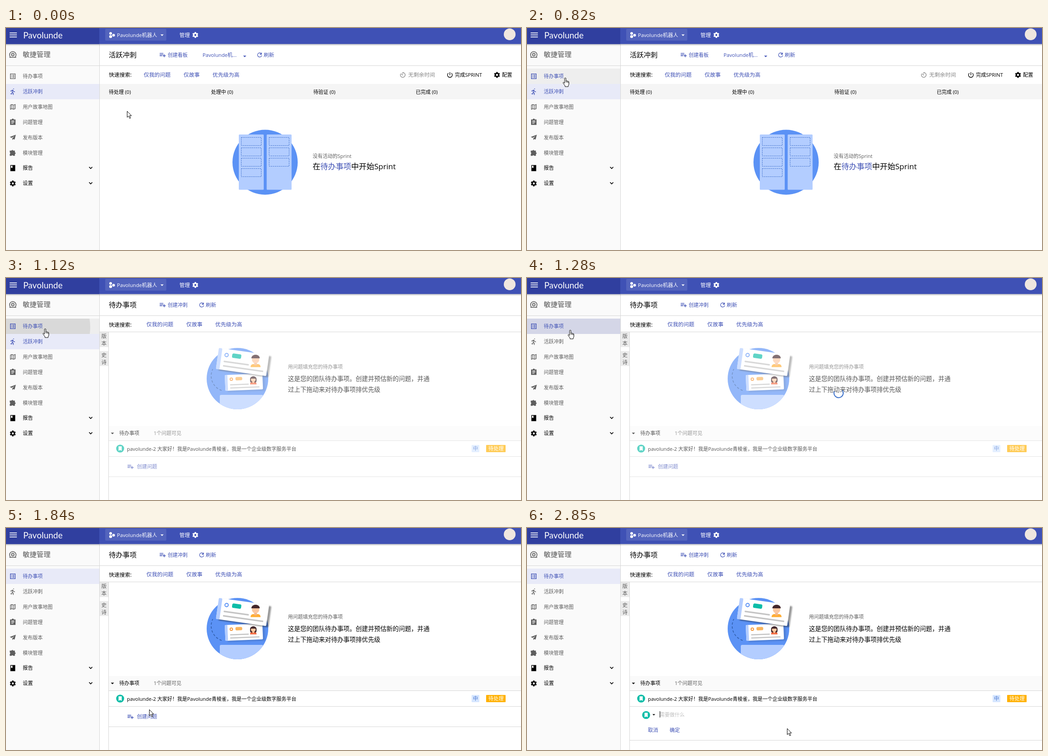
Write an HTML page with a canvas that moves like this. It is 1137 px wide and 492 px high and loops after 2.91 s.

```html
<!DOCTYPE html>
<html lang="zh">
<head>
<meta charset="utf-8">
<title>敏捷管理</title>
<style>
html, body { margin: 0; width: 100%; height: 100%; overflow: hidden; background: #fff; }
canvas { display: block; width: 1137px; height: 492px; }
</style>
</head>
<body>
<canvas id="stage" width="1137" height="492"></canvas>
<script>
const ctx = document.getElementById('stage').getContext('2d');
const LOOP = 2910, TAU = Math.PI * 2;
const FONT = '"Open Sans", "Noto Sans CJK SC", "Noto Sans CJK", sans-serif';
const BRAND = 'Pavolunde';
const INDIGO = '#3f51b5', GRAY = '#5e5e5e', BLUE = '#5b92f5', PALE = '#b3cdff', TEAL = '#0dbda8', RULE = '#d6d6d6';

// The screen is refreshed only at these moments.
const TICKS = [0, 40, 120, 200, 280, 360, 430, 510, 600, 680, 740, 820,
  970, 1050, 1120, 1200, 1280, 1350, 1430, 1530, 1650, 1710, 1770, 1840, 1890, 1980,
  2060, 2130, 2200, 2350, 2440, 2520, 2600, 2680, 2770, 2850];

// Pointer hotspot: time, x, y
const PATH = [[0, 267, 184], [510, 93, 123], [530, 93, 123], [820, 84, 110], [970, 84, 110],
  [1120, 86, 112], [1430, 103, 117], [1530, 103, 117], [1840, 316, 402], [1980, 305, 429],
  [2200, 305, 414], [2520, 305, 414], [2850, 574, 444]];

// Icons on a 24 unit grid
const STROKED = {
  list: 'M4 4H20V20H4ZM7 8H9M11 8H17M7 12H9M11 12H17M7 16H9M11 16H17',
  map: 'M4 6L9 4L15 6L20 4V18L15 20L9 18L4 20ZM9 4V18M15 6V20',
  run: 'M13 3H16M6 12V9L12 7L14 11L19 13M12 7L10 14L14 17V23M10 14L9 20L4 19',
  add: 'M2 7H14M2 11H14M2 15H10M17 10V20M12 15H22',
  refresh: 'M17.5 6.5A8 8 0 1 0 20 14M19 5V10H14Z',
  power: 'M12 3V13M7 6A8 8 0 1 0 17 6',
  timer: 'M12 8V4A8 8 0 1 1 5 8M12 13L7 8',
  agile: 'M2 20H22M6 20A9.5 9.5 0 1 1 18 20M8 12A4 4 0 0 0 16 12A4 4 0 0 0 8 12M11 12H13'
};
const FILLED = {
  clip: 'M3 3H9A3 3 0 0 1 15 3H21V21H3ZM7 7V9H17V7ZM7 11V13H17V11ZM7 15V17H14V15Z',
  plane: 'M22 3L2 10.5L8 13.5L18 7L10.5 15V21L13.5 17L18 19Z',
  puzzle: 'M4 5H8A2.5 2.5 0 0 1 13 5H19V11A2.5 2.5 0 0 1 19 16V22H13A2.7 2.7 0 0 0 8 22H2V16A2.7 2.7 0 0 0 2 11V5Z',
  book: 'M4 2H20V22H4ZM6 4V12L8.5 10.5L11 12V4Z',
  mark: 'M6 3H18V20L12 17L6 20Z'
};
const ARROW = new Path2D('M.5 .5V14L3.6 11L6 16.4L8.2 15.4L5.8 10.3H10Z');
const HAND = new Path2D('M4 11V2a1.5 1.5 0 0 1 3 0V7q1.5-1 2.5.5q1.5-.5 2.3.8q1.7-.2 1.7 1.5V14q0 2-1.5 4V20H5V18L1 12.5q-1-2 .5-2.3q1 0 2.5 2.3z');

function rect(x, y, w, h, color) {
  ctx.fillStyle = color;
  ctx.fillRect(x, y, w, h);
}
function round(x, y, w, h, r, color) {
  ctx.fillStyle = color;
  ctx.beginPath();
  ctx.roundRect(x, y, w, h, r);
  ctx.fill();
}
function disc(x, y, r, color) {
  ctx.fillStyle = color;
  ctx.beginPath();
  ctx.arc(x, y, r, 0, TAU);
  ctx.fill();
}
function arc(x, y, r, from, to, width, color) {
  ctx.strokeStyle = color;
  ctx.lineWidth = width;
  ctx.beginPath();
  ctx.arc(x, y, r, from, to);
  ctx.stroke();
}
function poly(color, ...points) {
  ctx.fillStyle = color;
  ctx.beginPath();
  points.forEach(([x, y]) => ctx.lineTo(x, y));
  ctx.fill();
}
// y is the vertical middle of the line
function text(value, x, y, size = 11, color = '#000', font = FONT) {
  ctx.font = `${size}px ${font}`;
  ctx.fillStyle = color;
  ctx.fillText(value, x, Math.round(y + size * 0.37));
}
function icon(name, x, y, color, size = 16) {
  ctx.save();
  ctx.translate(x - size / 2, y - size / 2);
  ctx.scale(size / 24, size / 24);
  ctx.lineWidth = 2;
  ctx.strokeStyle = ctx.fillStyle = color;
  if (STROKED[name]) ctx.stroke(new Path2D(STROKED[name]));
  else ctx.fill(new Path2D(FILLED[name]), 'evenodd');
  ctx.restore();
}
function gear(x, y, color) {
  arc(x, y, 3.6, 0, TAU, 2.8, color);
  ctx.lineWidth = 3.2;
  ctx.beginPath();
  for (let i = 0; i < 6; i++) {
    const a = i * TAU / 6 + TAU / 12;
    ctx.moveTo(x + 3.5 * Math.cos(a), y + 3.5 * Math.sin(a));
    ctx.lineTo(x + 6.5 * Math.cos(a), y + 6.5 * Math.sin(a));
  }
  ctx.stroke();
}
function caretDown(x, y, color, r = 3.5) {
  poly(color, [x - r, y - r / 2], [x + r, y - r / 2], [x, y + r / 2]);
}
function storyIcon(x, y) {
  disc(x, y, 8.8, TEAL);
  icon('mark', x, y + 0.3, '#fff', 14);
}

function pointerAt(t) {
  const i = PATH.findIndex(k => k[0] > t);
  if (i < 0) return PATH[PATH.length - 1].slice(1);
  const [t0, x0, y0] = PATH[i - 1], [t1, x1, y1] = PATH[i];
  let p = (t - t0) / (t1 - t0);
  if (i === 1) p = 1 - (1 - p) ** 2;
  return [x0 + (x1 - x0) * p, y0 + (y1 - y0) * p];
}
function drawPointer(x, y, hand) {
  ctx.save();
  ctx.translate(Math.round(x) - (hand ? 5 : 0), Math.round(y));
  const shape = hand ? HAND : ARROW;
  ctx.fillStyle = '#fff';
  ctx.strokeStyle = '#000';
  ctx.lineWidth = 1;
  ctx.fill(shape);
  ctx.stroke(shape);
  if (hand) ctx.stroke(new Path2D('M7 7V10.5M9.5 8V11M11.8 9V11.5'));
  ctx.restore();
}

function drawHeader() {
  const shade = ctx.createLinearGradient(0, 35, 0, 40);
  shade.addColorStop(0, 'rgba(0,0,0,.25)');
  shade.addColorStop(1, 'rgba(0,0,0,0)');
  rect(0, 35, 1137, 5, shade);
  rect(0, 0, 1137, 35.5, INDIGO);
  rect(0, 0, 206, 35.5, '#303f9f');
  for (let i = 0; i < 3; i++) rect(8, 10 + i * 4.5, 16, 1.7, '#fff');
  text(BRAND, 38, 16, 19, '#fff', 'Lato, sans-serif');
  round(219, 2, 135, 26, 2, '#5364bd');
  disc(231, 12, 3, '#fff');
  disc(231, 19, 3.2, '#fff');
  disc(237.5, 16, 3, '#fff');
  text(BRAND + '机器人', 245, 15.5, 11.2, '#fff');
  caretDown(344.5, 16, '#fff');
  text('管理', 383, 15.5, 11.5, '#fff');
  gear(418, 15.5, '#fff');
  disc(1112, 14, 13, '#efe6df');
}

function drawSidebar(t, py) {
  rect(0, 36, 206, 456, '#fafafa');
  rect(206, 36, 1, 456, RULE);
  rect(0, 83, 206, 1, RULE);
  icon('agile', 15, 59, '#555', 18);
  text('敏捷管理', 37, 58.5, 15.3, '#555');

  const switched = t >= 1200;
  const hovered = t >= 600 && t < 1650 && py < 124;
  rect(0, switched ? 90 : 124, 206, 34, '#e8eaf8');
  if (hovered) rect(0, 90, 206, 34, switched ? '#dde0f1' : '#eeeeee');
  if (t >= 970 && t < 1430) {
    ctx.save();
    ctx.beginPath();
    ctx.rect(0, 90, 206, 34);
    ctx.clip();
    const fade = Math.max(0, Math.min(1, (1430 - t) / 300));
    disc(84, 109, (t - 950) * 0.6, `rgba(0,0,0,${0.09 * fade})`);
    ctx.restore();
  }

  const items = [['list', '待办事项'], ['run', '活跃冲刺'], ['map', '用户故事地图'],
    ['clip', '问题管理'], ['plane', '发布版本'], ['puzzle', '模块管理']];
  items.forEach(([name, label], i) => {
    const y = 107 + i * 33.9;
    const lit = i === 0 ? hovered || switched : i === 1 && !switched;
    icon(name, 15, y, lit ? INDIGO : GRAY);
    text(label, 37, y, 11, lit ? INDIGO : GRAY);
  });
  icon('book', 15, 310.5, '#000');
  gear(15, 344.5, '#000');
  text('报告', 37, 310, 11.2);
  text('设置', 37, 344, 11.2);
  ctx.strokeStyle = '#000';
  ctx.lineWidth = 1.7;
  for (const y of [308, 342]) ctx.stroke(new Path2D(`M183.5 ${y}l3.5 3.5l3.5 -3.5`));
}

function drawToolbar(title, action, refreshX) {
  rect(207, 83, 930, 1, RULE);
  text(title, 227, 59.5, 15.3);
  icon('add', 346, 59.5, INDIGO);
  text(action, 357, 59.5, 11, INDIGO);
  icon('refresh', refreshX, 59.5, INDIGO, 14);
  text('刷新', refreshX + 9, 59.5, 11.5, INDIGO);
}
function drawFilters(x, y) {
  text('快速搜索:', 227, 104, 11.8);
  text('仅我的问题', x, y, 11.9, INDIGO);
  text('仅故事', x + 88, y, 11.9, INDIGO);
  text('优先级为高', x + 152, y, 11.9, INDIGO);
}

function drawSprintPage() {
  drawToolbar('活跃冲刺', '创建看板', 560);
  text(BRAND + '机...', 434, 60, 11.2, INDIGO);
  caretDown(527, 63, INDIGO);
  drawFilters(304, 104);
  icon('timer', 876, 104, '#888');
  text('无剩余时间', 888, 104, 11.8, '#888');
  icon('power', 980, 104, '#000');
  text('完成SPRINT', 991, 104, 11.2);
  gear(1084, 104, '#000');
  text('配置', 1095, 104, 11.3);

  rect(207, 124, 930, 34, '#f5f5f5');
  ['待处理', '处理中', '待验证', '已完成'].forEach((s, i) => text(s + ' (0)', 227 + i * 225.8, 142, 11));

  disc(572, 297.5, 72, BLUE);
  [[514, 4], [575.5, 3]].forEach(([x, count]) => {
    round(x, 236, 55, 122.5, 1.5, PALE);
    ctx.strokeStyle = '#4a78cf';
    ctx.lineWidth = 1;
    ctx.setLineDash([3, 1.5]);
    for (let i = 0; i < count; i++) ctx.strokeRect(x + 5.5, 242.5 + i * 23, 44, 18);
    ctx.setLineDash([]);
  });
  text('没有活动的Sprint', 677, 284, 11, GRAY);
  text('在', 677, 307, 17);
  text('待办事项', 694, 307, 17, INDIGO);
  text('中开始Sprint', 762, 307, 17);
}

function drawPerson(x, y, r, shirt, long) {
  if (long) round(x - r * 1.3, y - r * 1.2, r * 2.6, r * 2.7, r, '#43282c');
  round(x - r * 1.3, y + r * 1.15, r * 2.6, r * 0.8, [r * 0.7, r * 0.7, 0, 0], shirt);
  rect(x - r * 0.35, y + r * 0.7, r * 0.7, r * 0.75, '#f3b48c');
  disc(x, y, r * 0.95, '#fbc7a0');
  ctx.fillStyle = '#43282c';
  ctx.beginPath();
  ctx.ellipse(x, y - r * 0.35, r * 1.1, r * 0.95, 0, Math.PI, TAU);
  ctx.fill();
}
function drawTicket(x, y, angle, w, h, accent, tag, lines, shadow) {
  ctx.save();
  ctx.translate(x, y);
  ctx.rotate(angle);
  ctx.shadowColor = `rgba(0,0,0,${shadow})`;
  ctx.shadowOffsetX = 5;
  ctx.shadowOffsetY = 3;
  ctx.shadowBlur = 3;
  round(0, 0, w, h, 2, '#fff');
  ctx.shadowColor = 'transparent';
  round(0, 0, w * 0.07, h, 2, PALE);
  arc(w * 0.17, h * 0.28, h * 0.08, 0, TAU, 2, accent);
  round(w * 0.28, h * 0.16, w * 0.18, h * 0.21, 3, tag);
  lines.forEach(([ly, lw]) => round(w * 0.13, ly * h, lw * w, h * 0.07, 1, '#c4c4c4'));
  ctx.restore();
}
function drawBacklogArt() {
  disc(511, 223, 68, BLUE);
  ctx.save();
  ctx.beginPath();
  ctx.arc(511, 223, 68, 0, TAU);
  ctx.clip();
  round(472, 259, 96, 40, 3, PALE);
  ctx.restore();
  ctx.setLineDash([5, 4]);
  arc(487, 217, 34, 1.9, 3.6, 1.5, '#2f5ca8');
  ctx.setLineDash([]);
  drawTicket(483, 215, -0.04, 83, 35, '#f59b42', '#f9b55e', [[0.6, 0.5], [0.8, 0.78]], 0.12);
  drawPerson(546, 225, 5.5, '#f0643c', true);
  drawTicket(470, 155, 0.14, 112, 47, BLUE, TEAL, [[0.56, 0.5], [0.77, 0.8]], 0.4);
  drawPerson(551, 181, 8.5, '#ffad33', false);
}

function drawForm(t) {
  storyIcon(263, 414.5);
  caretDown(280, 414, '#000', 3);
  text('需要做什么', 293, 413.5, 11, '#bfbfbf');
  if (t >= 2600) rect(293, 406, 1, 14, '#000');
  text('取消', 267, 448, 11.3, INDIGO);
  text('确定', 315, 448, 11.3, INDIGO);
  rect(227, 470, 910, 1, RULE);
}

function drawBacklogPage(t) {
  drawBacklogArt();
  text('用问题填充您的待办事项', 622.5, 197, 11, GRAY);
  text('这是您的团队待办事项。创建并预估新的问题，并通', 622.5, 223, 13.6);
  text('过上下拖动来对待办事项排优先级', 622.5, 247, 13.6);

  rect(227, 328, 910, 32, '#fafafa');
  for (const y of [360, 395]) rect(227, y, 910, 1, RULE);
  caretDown(235, 344.5, '#000');
  text('待办事项', 250, 344, 11.1);
  text('1个问题可见', 326, 344, 11, GRAY);
  storyIcon(252, 378);
  text(`${BRAND.toLowerCase()}-2 大家好！我是${BRAND}青棱雀，我是一个企业级数字服务平台`, 267, 378.5, 11);
  round(1028, 370, 17, 16, 1, '#d6e6ff');
  text('中', 1031, 378, 11, '#4573cf');
  round(1060, 370, 43, 16, 1, '#ffb100');
  text('待处理', 1065, 378, 11.2, '#fff');

  if (t >= 2520) {
    drawForm(t);
  } else {
    if (t >= 1890) round(255, 404, 92, 27, 2, '#ebebeb');
    icon('add', 275, 418, INDIGO);
    text('创建问题', 289, 418, 11.2, INDIGO);
    rect(227, 440, 910, 1, RULE);
  }

  const clear = Math.max(0, Math.min(1, (t - 1600) / 240));
  if (clear < 1) rect(227, 120, 910, 372, `rgba(255,255,255,${0.34 * (1 - clear)})`);
  if (t >= 1200 && t < 1710) {
    const turn = (t - 1530) / 1000 * TAU;
    arc(688, 255, 10.2, 0.9 + turn, 5.1 + turn, 2, '#3b70c9');
  }

  drawToolbar('待办事项', '创建冲刺', 432);
  drawFilters(310, 102.5);
  rect(207, 119, 930, 1, RULE);
  rect(226, 120, 1, 372, RULE);
  [['版本', 120], ['史诗', 162]].forEach(([label, y]) => {
    rect(207, y, 19, 33, '#ececec');
    text(label[0], 210.5, y + 9, 11.5, GRAY);
    text(label[1], 210.5, y + 25, 11.5, GRAY);
  });
}

function draw(time) {
  const t = TICKS.filter(k => k <= time).pop();
  const [px, py] = pointerAt(t);
  rect(0, 0, 1137, 492, '#fff');
  if (t < 1120) drawSprintPage();
  else drawBacklogPage(t);
  drawSidebar(t, py);
  drawHeader();
  const onButton = t >= 1890 && t < 2520;
  drawPointer(px, py, px < 206 || onButton);
}

const start = performance.now();
function loop() {
  draw((performance.now() - start) % LOOP);
  requestAnimationFrame(loop);
}
loop();
</script>
</body>
</html>
```
